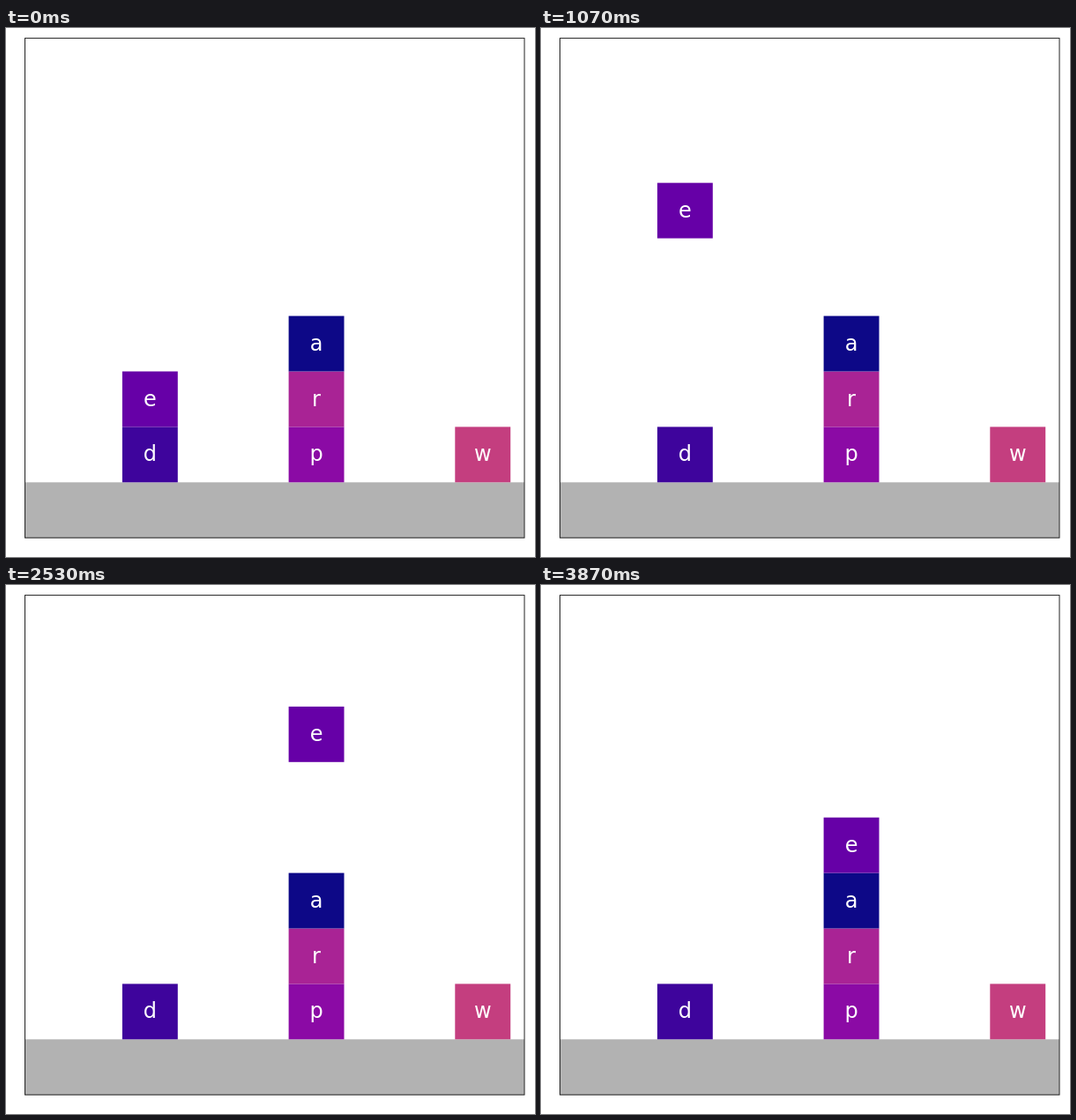
Animation of 600 by 600 pixels, one loop 4.87 s. Source, as an HTML page:

```html
<!DOCTYPE html>
<html lang="en">
<head>
<meta charset="utf-8">
<title>Blocks</title>
<style>
  html, body { margin: 0; width: 100%; height: 100%; overflow: hidden; background: #fff; }
  svg { display: block; width: 100vw; height: 100vh; }
  text { font: 24px "DejaVu Sans", sans-serif; fill: #fff; text-anchor: middle; }
</style>
</head>
<body>
<svg viewBox="0 0 600 600">
  <rect x="21.8" y="515.3" width="566.1" height="62.9" fill="#b2b2b2"/>
  <rect x="21.5" y="11.6" width="566.5" height="566.6" fill="none" stroke="#222"/>
  <g id="blocks"></g>
</svg>
<script>
const SIZE = 62.9, LEFT = 131.9, FLOOR = 515.3, LOOP = 4870;
const layer = document.getElementById("blocks");

// Column and height are measured in block sizes.
function place(block, column, height) {
  const x = LEFT + column * SIZE, y = FLOOR - (height + 1) * SIZE;
  block.setAttribute("transform", `translate(${x.toFixed(2)} ${y.toFixed(2)})`);
}

function addBlock(letter, color, column, height) {
  const block = document.createElementNS("http://www.w3.org/2000/svg", "g");
  block.innerHTML = `<rect width="${SIZE}" height="${SIZE}" fill="${color}"/>
    <text x="${SIZE / 2}" y="39">${letter}</text>`;
  layer.append(block);
  place(block, column, height);
  return block;
}

addBlock("d", "#3e049c", 0, 0);
addBlock("p", "#8b0aa5", 3, 0);
addBlock("r", "#a92395", 3, 1);
addBlock("a", "#0d0887", 3, 2);
addBlock("w", "#c43e7f", 6, 0);
const mover = addBlock("e", "#6600a7", 0, 1);

const clamp = v => Math.min(1, Math.max(0, v));

function draw(now) {
  // 15 steps per second, on a 10 ms clock
  const tick = Math.floor((now % LOOP) / 10);
  const step = Math.floor((tick + 0.5) * 3 / 20);
  const lift = step < 1 ? 0 : clamp((step + 1) / 20);
  const slide = step < 30 ? 0 : clamp((step - 28) / 10);
  const drop = clamp((step - 38) / 20);
  place(mover, 3 * slide, 1 + 4 * lift - 2 * drop);
}

const start = performance.now();
function loop() {
  draw(performance.now() - start);
  requestAnimationFrame(loop);
}
loop();
</script>
</body>
</html>
```
